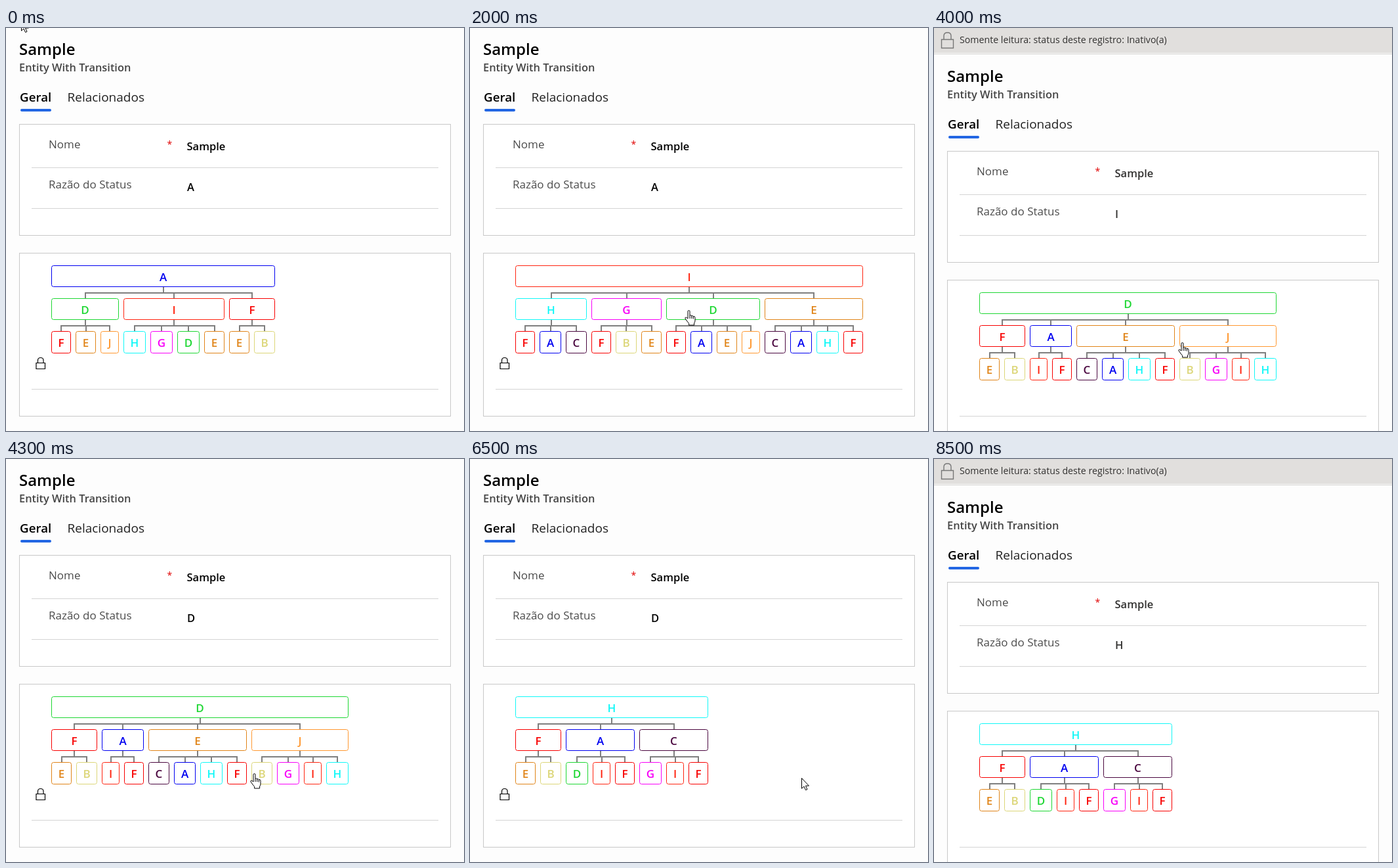
Write an HTML page that moves like this. It is 698 by 613 pixels and loops after 9000 ms.

```html
<!DOCTYPE html>
<html lang="pt">
<head>
<meta charset="utf-8">
<title>Entity With Transition</title>
<style>
html, body { margin: 0; width: 100%; height: 100%; overflow: hidden; background: #fdfdfd; }
svg { display: block; width: 698px; height: 613px; font-family: "Open Sans", "Noto Sans", sans-serif; }
.bold { font-weight: 600; }
.label { font-size: 17px; fill: #4c4c4c; }
.value { font-size: 16.5px; font-weight: 600; fill: #000; }
.inactive .value { fill: #323130; }
.inactive #smallLock, svg:not(.inactive) #bar { display: none; }
.card { fill: #fff; stroke: #c8c8c8; }
.rule { stroke: #d4d4d4; }
#tree text { font-size: 17px; font-weight: 600; text-anchor: middle; }
#tree rect { fill: #fff; }
#tree path { fill: none; stroke: #7f7f7f; stroke-width: 2; }
.pointer { fill: #fff; stroke: #000; stroke-linejoin: round; }
</style>
</head>
<body>
<svg id="stage" viewBox="0 0 698 613">
  <rect width="698" height="613" fill="#fdfdfd"/>
  <g id="bar">
    <rect width="698" height="38" fill="#e1dfdd"/>
    <path d="M0 39.5H698" stroke="#d2d0ce"/>
    <path d="M11.5 17.5H29.5V30.5H11.5ZM15 17.5V12Q15 7 20.5 7T26 12V17.5" fill="none" stroke="#777" stroke-width="1.4"/>
    <text x="39" y="23" font-size="14.2" fill="#323130">Somente leitura: status deste registro: Inativo(a)</text>
  </g>
  <g id="form">
    <text class="bold" x="20" y="41" font-size="24">Sample</text>
    <text class="bold" x="20" y="66" font-size="16.4" fill="#444">Entity With Transition</text>
    <text class="bold" x="21" y="112" font-size="18.8">Geral</text>
    <text x="93.5" y="112" font-size="19" fill="#222">Relacionados</text>
    <rect x="22" y="123" width="47" height="4" rx="2" fill="#2266e3"/>

    <rect class="card" x="20.5" y="146.5" width="657" height="169"/>
    <path class="rule" d="M39 212.5H659M39 274.5H659"/>
    <text class="label" x="65" y="183">Nome</text>
    <text x="245.5" y="182" font-size="14" fill="#e00000">*</text>
    <text class="value" x="275.5" y="186">Sample</text>
    <text class="label" x="65" y="244">Razão do Status</text>
    <text class="value" id="status" x="276" y="248"></text>

    <rect class="card" x="20.5" y="342.5" width="657" height="248"/>
    <path class="rule" d="M39 549.5H659"/>
    <g id="tree"></g>
    <path id="smallLock" d="M46 509.5H59.5V518.5H46ZM48.5 509.5V505.5Q48.5 501.5 52.75 501.5T57 505.5V509.5" fill="none" stroke="#000" stroke-width="1.2"/>
  </g>
  <g id="cursor">
    <path id="arrow" class="pointer" d="M.5 .5V16.2L4 13L6.6 18.6L9 17.5L6.5 12.1H11.5Z"/>
    <g id="hand" class="pointer" transform="translate(-6 0)">
      <path d="M5 13V2.2Q5 .6 6.5 .6T8 2.2V8.5Q9.5 7 10.8 8.8Q12.3 7.8 13.3 9.7Q15.8 9 16 11.5V16Q16 18.5 14.6 20V23H6.6V20.3Q4 17.5 .9 12.8Q.6 10.8 2.6 11.2Z"/>
      <path d="M8 8.5V13M10.8 8.8V13M13.3 9.7V13.5" fill="none"/>
    </g>
    <g id="denied" fill="none" stroke="#cc0000" stroke-width="2.3">
      <circle r="8" fill="#fff" stroke="none"/>
      <circle r="6.6"/>
      <path d="M-4.7 -4.7L4.7 4.7"/>
    </g>
  </g>
</svg>
<script>
const LOOP = 9000;
const LEFT = 69, GAP = 7, TOP = 361, PITCH = 50;
const HEIGHTS = [33, 33, 34];

// Allowed transitions between states; the root is never offered again.
const NEXT = {
  A: 'DIF', D: 'FAEJ', I: 'HGDE', F: 'EB', H: 'FAC',
  G: 'FBE', E: 'CAHF', J: 'BGIH', C: 'GIF'
};
const COLOR = {
  A: '#0000f0', B: '#dcd678', C: '#4b0840', D: '#1ed733', E: '#e08418',
  F: '#f80000', G: '#f800f8', H: '#10f8f8', I: '#ff2410', J: '#ff9830'
};
const WIDTH = { A: 33, B: 32, C: 32, D: 34, E: 31, F: 30, G: 34, H: 34, I: 27, J: 28 };

// time, tree root, status shown, inactive
const SCENES = [
  [0, 'A', 'A', false],
  [2000, 'I', 'A', false],
  [2300, 'I', 'I', true],
  [4000, 'D', 'I', true],
  [4300, 'D', 'D', false],
  [6500, 'H', 'D', false],
  [6700, 'H', 'H', true]
];

// time, x, y, shape
const POINTER = [
  [0, 23, -12, 'arrow'],
  [600, 40, 25, 'arrow'], [700, 110, 150, 'arrow'], [800, 230, 340, 'arrow'],
  [900, 345, 485, 'arrow'], [1000, 358, 499, 'arrow'], [1100, 335, 428, 'arrow'],
  [1300, 333, 429, 'hand'], [2300, 331, 429, 'denied'],
  [2600, 338, 440, 'arrow'], [2700, 350, 455, 'hand'], [2800, 362, 466, 'hand'],
  [2900, 372, 474, 'hand'], [3000, 378, 478, 'hand'],
  [5100, 390, 481, 'hand'], [5200, 420, 487, 'hand'], [5300, 460, 489, 'hand'],
  [5400, 492, 488, 'hand'], [5500, 504, 486, 'hand'], [5700, 506, 485, 'hand'],
  [6500, 505, 485, 'arrow'],
  [7200, 485, 483, 'arrow'], [7300, 450, 476, 'arrow'], [7400, 415, 468, 'arrow'],
  [7500, 385, 462, 'arrow'], [7600, 365, 458, 'arrow'], [7700, 353, 457, 'hand'],
  [7900, 350, 452, 'hand'], [8000, 335, 400, 'arrow'], [8100, 300, 310, 'arrow'],
  [8200, 255, 200, 'arrow'], [8300, 200, 95, 'arrow'], [8400, 140, 8, 'arrow'],
  [8500, 0, 0, 'none']
];

const $ = id => document.getElementById(id);
const mid = n => Math.round((n.x + n.right) / 2);

function layout(name, root, x, depth) {
  const node = { name, x, depth, kids: [] };
  if (depth === 2) {
    node.right = x + WIDTH[name];
    return node;
  }
  for (const kid of NEXT[name].replace(root, '')) {
    const child = layout(kid, root, x, depth + 1);
    node.kids.push(child);
    node.right = child.right;
    x = child.right + GAP;
  }
  return node;
}

function drawNode(node) {
  const { name, x, right, depth, kids } = node;
  const y = TOP + depth * PITCH, h = HEIGHTS[depth], c = COLOR[name];
  let out = `<rect x="${x + .5}" y="${y + .5}" width="${right - x - 1}" height="${h - 1}" rx="3" stroke="${c}"/>` +
    `<text x="${(x + right) / 2}" y="${y + 24}" fill="${c}">${name}</text>`;
  if (kids.length) {
    const rail = y + 42;
    const ends = [mid(kids[0]) - 1, mid(kids[kids.length - 1]) + 1];
    const drops = kids.map(k => `M${mid(k)} ${rail}V${y + PITCH}`).join('');
    out += `<path d="M${mid(node)} ${y + h}V${rail}M${ends[0]} ${rail}H${ends[1]}${drops}"/>`;
  }
  return out + kids.map(drawNode).join('');
}

function showScene([, root, status, inactive]) {
  $('stage').classList.toggle('inactive', inactive);
  $('form').setAttribute('transform', `translate(0 ${inactive ? 41 : 0})`);
  $('status').textContent = status;
  $('tree').innerHTML = drawNode(layout(root, root, LEFT, 0));
}

function showPointer([, x, y, shape]) {
  $('cursor').setAttribute('transform', `translate(${x} ${y})`);
  for (const id of ['arrow', 'hand', 'denied']) {
    $(id).style.display = id === shape ? '' : 'none';
  }
}

const at = (steps, t) => steps.filter(s => s[0] <= t).pop();
let scene, pointer;

function draw() {
  const t = performance.now() % LOOP;
  const s = at(SCENES, t), p = at(POINTER, t);
  if (s !== scene) showScene(scene = s);
  if (p !== pointer) showPointer(pointer = p);
  requestAnimationFrame(draw);
}
draw();
</script>
</body>
</html>
```
